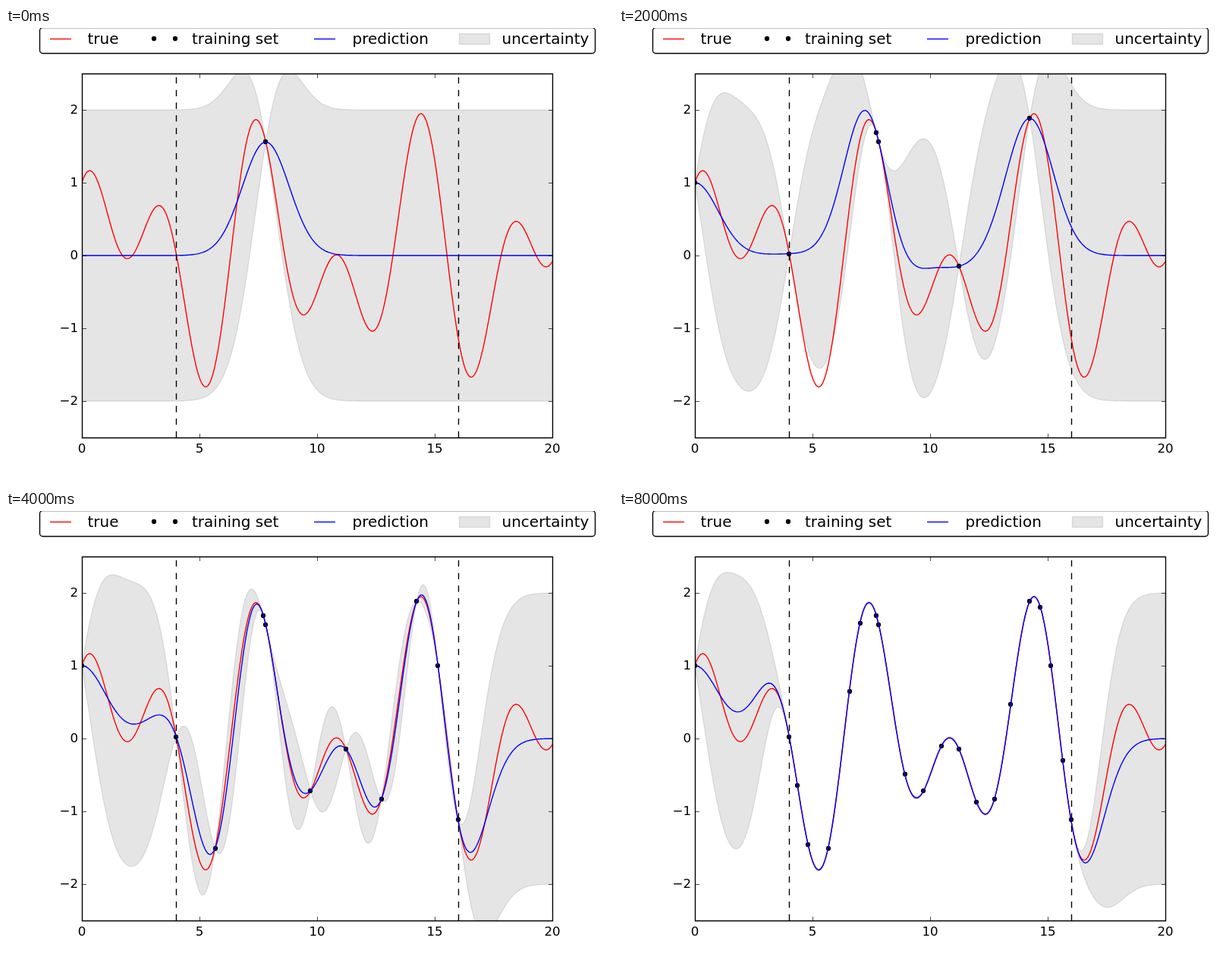
An HTML page with a canvas for the animation above (8400 ms loop, 800 px wide and 600 px high).

```html
<!DOCTYPE html>
<html lang="en">
<head>
<meta charset="utf-8">
<title>Gaussian process regression</title>
<style>
  html, body { margin: 0; width: 100%; height: 100%; overflow: hidden; background: #fff; }
  canvas { display: block; }
</style>
</head>
<body>
<canvas id="plot" width="800" height="600"></canvas>
<script>
const ctx = document.getElementById('plot').getContext('2d');
const POINT = 100 / 72;              // one typographic point in pixels
const STEP_MS = 400;
const SHADE = 'rgba(0,0,0,0.1)';
const FONT = '"DejaVu Sans", sans-serif';

const GRID = Array.from({ length: 400 }, (_, i) => i * 20 / 399);
// Grid indices of the samples, in the order they join the training set.
const SAMPLES = [156, 154, 0, 284, 80, 224, 319, 113, 254, 194, 302,
                 96, 209, 131, 268, 178, 239, 312, 87, 140, 293];

const truth = x => Math.sin(x) + Math.cos(Math.sqrt(3) * x);
const kernel = (a, b) => Math.exp(-((a - b) ** 2) / 2);
const dot = (a, b) => a.reduce((sum, value, i) => sum + value * b[i], 0);
const toX = x => 100 + 31 * x;
const toY = y => 300 - 96 * y;

// Solves L v = b for a lower triangular L.
function forward(L, b) {
  const v = [];
  b.forEach((value, i) => v.push((value - dot(v, L[i])) / L[i][i]));
  return v;
}

// Posterior mean and two-sigma band of the process on the grid.
function regress(xs) {
  const L = [];
  xs.forEach((x, i) => {
    const row = forward(L, xs.slice(0, i).map(other => kernel(x, other)));
    L.push([...row, Math.sqrt(1 + 1e-10 - dot(row, row))]);
  });
  const z = forward(L, xs.map(truth));
  const mean = [], upper = [], lower = [];
  GRID.forEach((x, i) => {
    const v = forward(L, xs.map(other => kernel(x, other)));
    const band = 2 * Math.sqrt(Math.max(0, 1 - dot(v, v)));
    mean[i] = dot(v, z);
    upper[i] = mean[i] + band;
    lower[i] = mean[i] - band;
  });
  return { xs, mean, upper, lower };
}

const states = SAMPLES.map((_, n) => regress(SAMPLES.slice(0, n + 1).map(i => GRID[i])));
const trueCurve = GRID.map(truth);

function stroke(color, width = POINT) {
  ctx.strokeStyle = color;
  ctx.lineWidth = width;
  ctx.stroke();
}

function segment(x1, y1, x2, y2, color = '#000', width = POINT) {
  ctx.beginPath();
  ctx.moveTo(x1, y1);
  ctx.lineTo(x2, y2);
  stroke(color, width);
}

function curve(values, color) {
  ctx.beginPath();
  values.forEach((y, i) => ctx.lineTo(toX(GRID[i]), toY(y)));
  stroke(color);
}

function marker(x, y) {
  ctx.fillStyle = '#000';
  ctx.beginPath();
  ctx.arc(Math.round(x), Math.round(y), 3.13, 0, 2 * Math.PI);
  ctx.fill();
}

function shade() {
  ctx.fillStyle = SHADE;
  ctx.fill();
  stroke(SHADE);
}

function label(text, x, y, size, align) {
  ctx.font = `${size}px ${FONT}`;
  ctx.textAlign = align;
  ctx.fillStyle = '#000';
  ctx.fillText(text, x, y);
}

function drawData({ xs, mean, upper, lower }) {
  ctx.save();
  ctx.beginPath();
  ctx.rect(100, 60, 620, 480);
  ctx.clip();
  ctx.lineJoin = 'round';

  ctx.beginPath();
  upper.forEach((y, i) => ctx.lineTo(toX(GRID[i]), toY(y)));
  for (let i = GRID.length - 1; i >= 0; i--) ctx.lineTo(toX(GRID[i]), toY(lower[i]));
  ctx.closePath();
  shade();

  curve(trueCurve, '#f00');
  xs.forEach(x => marker(toX(x), toY(truth(x))));
  curve(mean, '#00f');

  ctx.setLineDash([6 * POINT, 6 * POINT]);
  for (const x of [4, 16]) segment(toX(x) + 0.5, 540, toX(x) + 0.5, 60);
  ctx.restore();
}

function drawAxes() {
  const tick = 4 * POINT, thin = POINT / 2, size = 12 * POINT;
  for (let x = 0; x <= 20; x += 5) {
    const px = toX(x) + 0.5;
    segment(px, 540.5, px, 540.5 - tick, '#000', thin);
    segment(px, 60.5, px, 60.5 + tick, '#000', thin);
    label(x, toX(x), 560, size, 'center');
  }
  for (let y = -2; y <= 2; y++) {
    const py = toY(y) + 0.5;
    segment(100.5, py, 100.5 + tick, py, '#000', thin);
    segment(720.5, py, 720.5 - tick, py, '#000', thin);
    label(String(y).replace('-', '\u2212'), 95, toY(y) + 5, size, 'right');
  }
  ctx.beginPath();
  ctx.rect(100.5, 60.5, 620, 480);
  stroke('#000');
}

function drawLegend() {
  ctx.beginPath();
  ctx.roundRect(44.5, -0.5, 732, 34, 4);
  ctx.fillStyle = '#fff';
  ctx.fill();
  stroke('#000');

  segment(58, 14.5, 86, 14.5, '#f00');
  marker(195, 14);
  marker(223, 14);
  segment(406, 14.5, 434, 14.5, '#00f');
  ctx.beginPath();
  ctx.rect(597.5, 7.5, 40, 14);
  shade();

  const entries = { 'true': 107.5, 'training set': 245, 'prediction': 456.5, 'uncertainty': 653.5 };
  for (const [text, x] of Object.entries(entries)) label(text, x, 21, 20, 'left');
}

function draw(time) {
  ctx.fillStyle = '#fff';
  ctx.fillRect(0, 0, 800, 600);
  drawData(states[Math.floor(time / STEP_MS) % states.length]);
  drawAxes();
  drawLegend();
}

const start = performance.now();
function tick() {
  draw(performance.now() - start);
  requestAnimationFrame(tick);
}
tick();
</script>
</body>
</html>
```
